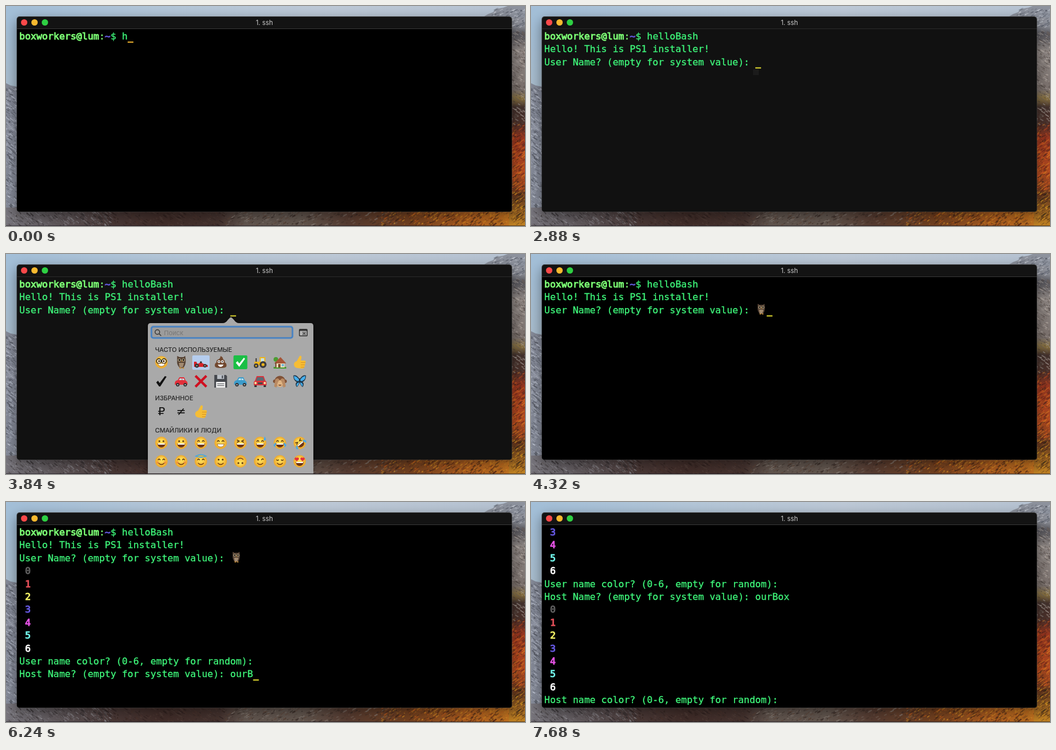
An HTML page with a canvas that plays this animation: 900x382 px, repeating every 8000 ms.

```html
<!DOCTYPE html>
<html lang="en">
<meta charset="utf-8">
<title>Terminal installer</title>
<style>
html, body { margin: 0; height: 100%; overflow: hidden; background: #000 }
canvas { display: block }
</style>
<canvas id="stage" width="900" height="382"></canvas>
<script>
const ctx = document.getElementById('stage').getContext('2d');
const STEP = 480, LOOP = 8000, ROWS = 14;
const CHAR = 9.89, LINE = 22.4, LEFT = 23, BASE = 58;
const GREEN = '#3ff87b', REGULAR = .3, BOLD = .95;
const MONO = '16.43px "DejaVu Sans Mono", monospace';
const SANS = 'Inter, "Noto Sans", sans-serif';

let seed;
const random = () => (seed = seed * 16807 % 2147483647) / 2147483647;

function rect(color, x, y, w, h, r = 0) {
  ctx.fillStyle = color;
  ctx.beginPath();
  ctx.roundRect(x, y, w, h, r);
  ctx.fill();
}

function text(str, x, y, color, font, { align = 'left', weight = 0 } = {}) {
  ctx.fillStyle = ctx.strokeStyle = color;
  ctx.font = font;
  ctx.textAlign = align;
  ctx.fillText(str, x, y);
  if (!weight) return;
  ctx.lineWidth = weight;
  ctx.strokeText(str, x, y);
}

function fill(color, path) {
  ctx.fillStyle = color;
  ctx.fill(new Path2D(path));
}

function stroke(color, path, width = 1.4) {
  ctx.strokeStyle = color;
  ctx.lineWidth = width;
  ctx.stroke(new Path2D(path));
}

function gradient(stops, x, y, w, h, vertical) {
  const g = vertical ? ctx.createLinearGradient(0, y, 0, y + h) : ctx.createLinearGradient(x, 0, x + w, 0);
  stops.forEach(([at, color]) => g.addColorStop(at, color));
  rect(g, x, y, w, h);
}

const dot = (x, y, r) => `M${x - r} ${y}a${r} ${r} 0 1 0 ${2 * r} 0a${r} ${r} 0 1 0 ${-2 * r} 0`;

// Desktop

// Short slanted strokes that read as rock and leaves
function texture(count, x, y, w, h, slope, colors) {
  for (let i = 0; i < count; i++) {
    const px = x + random() * w, py = y + random() * h, run = 1 + random() * 6;
    ctx.globalAlpha = .25 + random() * .45;
    stroke(colors[Math.floor(random() * colors.length)], `M${px} ${py}l${run} ${run * slope}`, .7 + random() * 1.5);
  }
  ctx.globalAlpha = 1;
}

function desktop() {
  seed = 77;
  gradient([[0, '#a3bfd8'], [.3, '#b3c6d8'], [.6, '#bdc9d7'], [1, '#b6c3d2']], 0, 0, 900, 40);
  gradient([[0, '#a3bfd8'], [1, '#a9bdcd']], 0, 20, 25, 125, true);
  fill('#858a98', 'M0 134L8 138L25 141V382H0Z');
  texture(520, -3, 140, 24, 242, .8, ['#c3c8d5', '#454851', '#5c606c', '#aeb4c2']);

  gradient([[0, '#77757c'], [.1, '#5f575a'], [.2, '#4b3a38'], [.3, '#412d29'], [.41, '#45332f'], [.46, '#62564f'],
    [.57, '#645850'], [.66, '#573c31'], [.78, '#74411f'], [.9, '#b2601f'], [1, '#c47a20']], 0, 350, 900, 32);
  texture(300, 0, 355, 180, 27, .8, ['#2f2a2c', '#96949a', '#6b6567']);
  texture(240, 170, 355, 210, 27, .6, ['#2a1d1b', '#57433d', '#4d352e']);
  texture(360, 375, 355, 300, 27, -.5, ['#8b8078', '#342824', '#5f4436']);
  texture(420, 650, 355, 250, 27, -.7, ['#e69a26', '#4d2314', '#2f1d16', '#cf611b']);

  gradient([[0, '#a3a7b0'], [.09, '#8a8c94'], [.13, '#55545a'], [.2, '#8d8683'], [.38, '#7b716d'],
    [.42, '#87703f'], [.46, '#42302b'], [.54, '#4c3029'], [.6, '#98361f'], [.76, '#b04a1f'],
    [.86, '#67391f'], [1, '#c28322']], 872, 0, 28, 382, true);
  fill('#8d929d', 'M826 20L836 14L844 11L851 5L862 3L870 0H900V20Z');
  texture(150, 842, 6, 56, 32, -.5, ['#e4e8ef', '#474c58', '#6d727e']);
  texture(260, 874, 40, 26, 165, .6, ['#b7ada6', '#463d3b', '#695f59']);
  texture(300, 874, 205, 26, 125, -.7, ['#e05a22', '#5c2017', '#d87923', '#33221d']);
  texture(140, 874, 325, 26, 55, -.7, ['#eaa924', '#4c2717', '#2f2318']);
  rect('rgba(20,15,25,.6)', 0, 381, 900, 1);
}

function terminalWindow(inactive) {
  ctx.save();
  ctx.shadowColor = 'rgba(0,0,0,.42)';
  ctx.shadowBlur = 22;
  ctx.shadowOffsetY = 7;
  rect('#3a3a3a', 18.5, 18, 859, 339.5, 5);
  ctx.restore();
  rect('#131313', 19, 19, 858, 338, 5);
  rect(inactive ? '#111' : '#000', 19, 40, 858, 317, [0, 0, 4, 4]);
  rect(inactive ? '#2b2b2b' : '#383838', 19, 39, 858, 1);
  ['#f9494a', '#f8b92f', '#2ed043'].forEach((c, i) => fill(c, dot(31.5 + 18 * i, 28.5, 5.5)));
  text('1. ssh', 448, 33, '#cacaca', '11.3px ' + SANS, { align: 'center' });
}

// Emoji, each drawn around its own centre

const wheels = [['#2b2b2e', dot(-6, 6, 3) + dot(7, 6, 3)], ['#bbb', dot(-6, 6, 1.2) + dot(7, 6, 1.2)]];
const car = color => [
  [color, 'M-11 3Q-11-1-6-2L-3-7H5L8-1Q11 0 11 4V6H-11Z'],
  ['#bfe3ee', 'M-4-2L-2-5H1V-2ZM2-5H4L6-2H2Z'], ...wheels];
const emoji = {
  owl: [
    ['#574436', 'M-7-11L-3-9H4L7-11L8-4Q8 6 3 10H-2Q-8 5-7-3Z'],
    ['#a28a70', 'M-4 1H5L3 8Q0 10-3 8Z'],
    ['#d9c9a2', dot(-3, -4, 2.6) + dot(4, -4, 2.6)],
    ['#17120f', dot(-3, -4, 1.7) + dot(4, -4, 1.7)],
    ['#c58d36', 'M0-3H2L1 0ZM-3 9H0V11H-3ZM2 9H5V11H2Z']],
  racer: [
    ['#d8232a', 'M-12 6V-1H-8L-6 3L0 0L5 3L12 5V8H-12Z'],
    ['#333', dot(-7, 6, 3.4) + dot(7, 6, 3) + dot(0, 0, 1.8)],
    ['#999', dot(-7, 6, 1.2) + dot(7, 6, 1.2)]],
  pile: [
    ['#71482f', 'M0-11Q5-8 4-5Q8-4 7 0Q11 2 10 7Q9 10 0 10T-10 7Q-11 2-7 0Q-8-4-4-5Q-1-6 0-11Z'],
    ['#fff', dot(-3, -1, 2.4) + dot(3, -1, 2.4) + 'M-5 4H5Q3 8 0 8T-5 4Z'],
    ['#222', dot(-3, -1, 1.1) + dot(3, -1, 1.1)]],
  box: [
    ['#1bbf45', 'M-10-12H10Q12-12 12-10V10Q12 12 10 12H-10Q-12 12-12 10V-10Q-12-12-10-12Z'],
    ['#fff', 'M-8 1L-5-2L-2 2L6-8L8-6L-2 8Z']],
  tractor: [
    ['#eeb51c', 'M-10-1H-1V-9H9V5H-10Z'],
    ['#c7e2e6', 'M1-7H7V-1H1Z'],
    ['#3c3c3e', dot(5, 4, 6) + dot(-7, 6, 4) + 'M-8-7H-6V-1H-8Z'],
    ['#eeb51c', dot(5, 4, 2.6) + dot(-7, 6, 1.6)]],
  house: [
    ['#4b9c32', dot(-7, -5, 4) + 'M-11 8H11V11H-11Z'],
    ['#eadcb9', 'M-6 1H8V9H-6Z'],
    ['#a65538', 'M-10 2L1-9L11 2Z'],
    ['#7b4a2c', 'M-3 3H1V9H-3ZM-8 0H-6V9H-8Z'],
    ['#74b8d8', 'M3 3H7V7H3Z']],
  thumb: [
    ['#f6bd35', 'M-4 10Q-10 9-10 3Q-9-1-5-2L0-11Q4-12 3-7L2-3H9Q11-2 10 1L8 9Q7 11 4 11Z'],
    ['#d99424', 'M2 0H10V1H2ZM2 4H9V5H2ZM2 8H8V9H2Z']],
  tick: [['#111', 'M-9 2L-6-1L-3 3L6-9L9-8L-2 9H-4Z']],
  redCar: car('#e2303a'),
  cross: [['#cf1020', 'M-11-8L-8-11L0-3L8-11L11-8L3 0L11 8L8 11L0 3L-8 11L-11 8L-3 0Z']],
  floppy: [
    ['#45484d', 'M-11-11H9L11-9V11H-11Z'],
    ['#b9bec5', 'M-6-11H6V-4H-6Z'],
    ['#f0f0f0', 'M-8 1H8V11H-8Z'],
    ['#45484d', 'M2-10H4V-5H2ZM-6 4H6V5H-6ZM-6 7H6V8H-6Z']],
  blueCar: car('#3d9ccb'),
  front: [
    ['#333', 'M-10 5H-6V10H-10ZM6 5H10V10H6Z'],
    ['#d9333b', 'M-9-1L-6-9H6L9-1L11 1V7H-11V1Z'],
    ['#5b6b74', 'M-7-1L-5-7H5L7-1Z'],
    ['#f5e7a2', dot(-8, 3, 2) + dot(8, 3, 2)],
    ['#444', 'M-4 2H4V5H-4Z']],
  monkey: [
    ['#805237', dot(0, 0, 9.5) + dot(-9, 0, 3) + dot(9, 0, 3)],
    ['#dfb483', dot(0, 4, 6)],
    ['#b98a62', 'M-10 9L-8-3Q-4-7-1-3L-4 3L-6 11ZM10 9L8-3Q4-7 1-3L4 3L6 11Z'],
    ['#5e3523', 'M-3 6H3Q0 9-3 6Z']],
  butterfly: [
    ['#1c3346', 'M-1-5Q-6-12-11-10Q-11-1-5 1Q-9 5-5 10Q-2 8 0 2Q2 8 5 10Q9 5 5 1Q11-1 11-10Q6-12 1-5Z'],
    ['#45aeec', 'M-1-3Q-6-10-10-9Q-10-1-2 0ZM1-3Q6-10 10-9Q10-1 2 0ZM-1 2Q-7 3-5 9Q-2 7-1 2ZM1 2Q7 3 5 9Q2 7 1 2Z']]
};

function place(x, y, paint, scale = 1) {
  ctx.save();
  ctx.translate(x, y);
  ctx.scale(scale, scale);
  paint();
  ctx.restore();
}

const drawEmoji = (name, x, y, scale) => place(x, y, () => emoji[name].forEach(part => fill(...part)), scale);

// Face code: eyes, mouth, then extras
const eyes = {
  o: () => fill('#57340f', dot(-3.5, -3, 1.6) + dot(3.5, -3, 1.6)),
  n: () => stroke('#57340f', 'M-6-2Q-4-6-2-2M2-2Q4-6 6-2'),
  u: () => stroke('#57340f', 'M-6-3Q-4 0-2-3M2-3Q4 0 6-3'),
  x: () => stroke('#57340f', 'M-6-5L-2-3L-6-1M6-5L2-3L6-1'),
  w: () => { fill('#57340f', dot(-3.5, -3, 1.6)); stroke('#57340f', 'M2-2Q4-6 6-3'); },
  h: () => fill('#e32f3c', 'M-5 0L-9-4Q-8-8-5-6Q-2-8-1-4ZM5 0L9-4Q8-8 5-6Q2-8 1-4Z'),
  g: () => {
    fill('#fff', dot(-4, -2, 3) + dot(4, -2, 3));
    fill('#4a2d14', dot(-4, -2, 1.7) + dot(4, -2, 1.7));
    stroke('#222', dot(-4.5, -2, 4) + dot(4.5, -2, 4));
  }
};
const mouths = {
  D: () => { fill('#6d3517', 'M-7 1H7Q6 8 0 8T-7 1Z'); fill('#fff', 'M-6 1H6V3H-6Z'); },
  t: () => { fill('#fff', 'M-6 2H6Q5 7 0 7T-6 2Z'); stroke('#8b5a22', 'M-6 2H6Q5 7 0 7T-6 2Z', .8); },
  s: () => stroke('#6d3b12', 'M-5 3Q0 8 5 3')
};
const extras = {
  d: () => fill('#4ba9e8', 'M8-11Q12-5 8-4T8-11Z'),
  c: () => fill('#4ba9e8', 'M-7-1Q-13 3-10 6T-7-1ZM7-1Q13 3 10 6T7-1Z'),
  a: () => stroke('#4aa7de', 'M-9-9Q0-14 9-9Q0-5-9-9Z', 1.8),
  b: () => fill('rgba(238,104,60,.5)', dot(-6.5, 2, 2) + dot(6.5, 2, 2))
};

function face(code, x, y) {
  const [eye, mouth, ...more] = code;
  place(x, y, () => {
    if (more.includes('f')) ctx.rotate(Math.PI);
    if (more.includes('r')) ctx.rotate(-.7);
    const skin = ctx.createRadialGradient(0, -3, 2, 0, 0, 11);
    skin.addColorStop(0, '#ffdf58');
    skin.addColorStop(1, '#eba52a');
    fill(skin, dot(0, 0, 10.7));
    eyes[eye]();
    mouths[mouth]();
    more.forEach(key => extras[key]?.());
  });
}

function picker() {
  const column = i => 269.5 + 34.25 * i;
  const row = (names, paint, y, first = 0) => names.split(' ').forEach((n, i) => paint(n, column(i + first), y));
  ctx.save();
  ctx.shadowColor = 'rgba(0,0,0,.4)';
  ctx.shadowBlur = 8;
  fill('#a9a9a9', 'M246 381V125Q246 120 251 120H376Q381 120 385 114L388 111Q390 109 392 111L395 114Q399 120 404 120H528Q533 120 533 125V381Z');
  ctx.restore();
  rect('#6d92bb', 250.5, 124.5, 248, 23, 5);
  rect('#3f7fc6', 251.5, 125.5, 246, 21, 4);
  rect('#9c9c9c', 253.5, 127.5, 242, 17, 2);
  stroke('#333', dot(262.5, 135.5, 4) + 'M265.5 138.5L269 142');
  text('Поиск', 274, 140.5, '#777', '11px ' + SANS);
  rect('#333', 508, 130, 15, 13, 2);
  rect('#b5b5b5', 509.5, 133.5, 12, 8, 1);
  text('⌘', 517, 141, '#333', '8px "DejaVu Sans", sans-serif', { align: 'center' });
  [['ЧАСТО ИСПОЛЬЗУЕМЫЕ', 169.5], ['ИЗБРАННОЕ', 253.5], ['СМАЙЛИКИ И ЛЮДИ', 309.5]]
    .forEach(([label, y]) => text(label, 258.5, y, '#262626', '10.8px ' + SANS, { weight: .2 }));

  rect('#b5cdee', 323, 176, 30, 25, 2);
  row('gt', face, 188);
  row('owl racer pile box tractor house thumb', drawEmoji, 188, 1);
  row('tick redCar cross floppy blueCar front monkey butterfly', drawEmoji, 221);
  row('₽ ≠', (s, x, y) => text(s, x, y, '#111', '20px "DejaVu Sans", sans-serif', { align: 'center' }), 280);
  row('thumb', drawEmoji, 274, 2);
  row('oD oD nD nt xD nDd nDc xDcr', face, 328);
  row('nsb nsb nsa os osf ws us hD', face, 360);
}

// Terminal content: a line is a list of [string, colour, weight]

const plain = str => [[str, GREEN, REGULAR]];
const palette = ['#606060', '#e5505a', '#f4f367', '#6558e0', '#e453e4', '#72f6ea', '#fff']
  .map((color, i) => [[' ' + i, color, BOLD]]);

function screen(step) {
  const lines = [[
    ['boxworkers@lum', '#7dff75', BOLD], [':', '#7dff75', REGULAR], ['~', '#6158d8', BOLD],
    ['$ ' + 'helloBash '.slice(0, 1 + 3 * step), GREEN, REGULAR]]];
  if (step >= 4) lines.push(plain('Hello! This is PS1 installer!'),
    [...plain('User Name? (empty for system value): '), ...(step >= 9 ? [['  ', 'owl']] : [])]);
  if (step >= 10) lines.push(...palette, plain('User name color? (0-6, empty for random): '));
  if (step >= 11) lines.push(plain('Host Name? (empty for system value): ' + 'ourBox'.slice(0, 2 * (step - 11))));
  if (step >= 15) lines.push(...palette, plain('Host name color? (0-6, empty for random): '));
  return lines.slice(-ROWS);
}

function draw(step) {
  const inactive = step >= 6 && step <= 8;
  desktop();
  terminalWindow(inactive);
  let x, y;
  screen(step).forEach((line, row) => {
    x = LEFT;
    y = BASE + row * LINE;
    for (const [str, color, weight] of line) {
      if (color === 'owl') drawEmoji('owl', x + 10, y - 7, .84);
      else text(str, x, y, color, MONO, { weight });
      x += str.length * CHAR;
    }
  });
  if (step < 16) rect(step < 4 ? '#f4b62f' : '#e3dc30', x, y + 3.7, 10, 2);
  if (step === 6) rect('#1b1b1b', 385, 110, 10, 10);
  if (step === 7 || step === 8) picker();
}

let shown = -1;
function tick(now) {
  const step = Math.floor(now % LOOP / STEP);
  if (step !== shown) draw(shown = step);
  requestAnimationFrame(tick);
}
requestAnimationFrame(tick);
</script>
</html>
```
